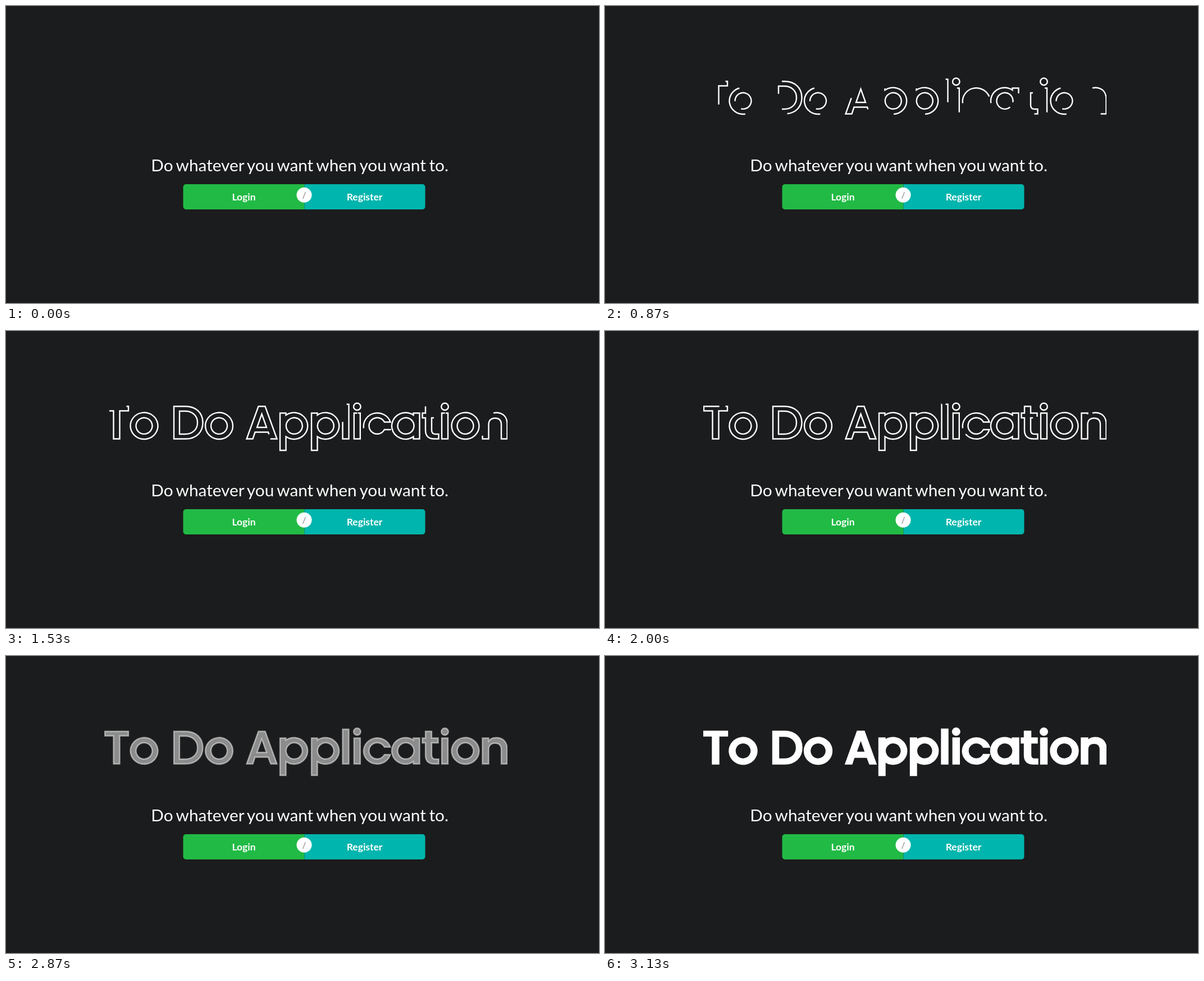
An HTML page that plays this animation: 1056x530 px, repeating every 8000 ms.

```html
<!DOCTYPE html>
<html lang="en">
<head>
<meta charset="utf-8">
<title>To Do Application</title>
<style>
  html, body { margin: 0; width: 100%; height: 100%; overflow: hidden; background: #1b1c1d; }
  svg { display: block; width: 1056px; height: 530px; }
  text { font-family: Lato, sans-serif; fill: #fff; }
  .lead { font-size: 29.75px; word-spacing: -2px; }
  .button { font-size: 17.5px; font-weight: 700; text-anchor: middle; }
  .or { font-size: 15px; font-weight: 700; text-anchor: middle; fill: rgba(0, 0, 0, .4); }
  #title path { fill: #fff; stroke: #fff; stroke-width: 2.4; fill-rule: evenodd; }
</style>
</head>
<body>
<svg viewBox="0 0 1056 530">
  <clipPath id="crop"><rect x="175" y="120" width="718" height="100"/></clipPath>
  <g id="title" clip-path="url(#crop)"></g>
  <text class="lead" x="258.300" y="295">Do whatever you want when you want to.</text>
  <path fill="#21ba45" d="M531.500 318H320.500a5 5 0 0 0 -5 5V358a5 5 0 0 0 5 5H531.500Z"/>
  <path fill="#00b5ad" d="M531.500 318H741.500a5 5 0 0 1 5 5V358a5 5 0 0 1 -5 5H531.500Z"/>
  <text class="button" x="423.500" y="347">Login</text>
  <text class="button" x="638.500" y="347">Register</text>
  <circle cx="531" cy="337.300" r="13.500" fill="#fff"/>
  <text class="or" x="531" y="342.500">/</text>
</svg>
<script>
const LOOP = 8000;
const DRAW = { from: -70, span: 2560, show: 65, hide: 2720 };
const FILL = { from: 2755, span: 400 };
const LEAD = 4; // each contour starts this far ahead of its corner
const MID = 169.3;

// Closed ellipse starting at an angle in degrees, dir 1 = clockwise
function ring(cx, cy, rx, ry, deg, dir) {
  const a = deg * Math.PI / 180;
  const dx = rx * Math.cos(a), dy = ry * Math.sin(a);
  const arc = s => `A${rx} ${ry} 0 0 ${dir > 0 ? 1 : 0} ${cx + s * dx} ${cy + s * dy}`;
  return `M${cx + dx} ${cy + dy}${arc(-1)}${arc(1)}Z`;
}

const bowl = (cx, deg) => ring(cx, MID, 14.5, 14.5, deg, -1);
const o = cx => ring(cx, MID, 24.5, 23.7, 81, 1) + bowl(cx, 105);
const p = x => `M${x + 10.5} 147V150A24.5 23.7 0 1 1 ${x + 10.5} 188.6V213H${x}V146.5H${x + 10.5}Z` +
  bowl(x + 25.3, 10);
const i = cx => `M${cx + 1.5} 146.5H${cx + 5.5}V192.5H${cx - 5.5}V146.5Z` +
  ring(cx, 135, 6.3, 6.3, 90, 1);

const T = "M214.5 134.5H218V142.5H202.5V192.5H191.5V142.5H176V134.5Z";
const D = "M315 134.5H320C338 134.5 350.5 146 350.5 163.5S338 192.5 320 192.5H299V134.5Z" +
  "M315 184H319C332 184 341 176 341 163.5S332 143 319 143H309V184Z";
const A = "M468.3 184.3L467 180.5H443.5L439.5 192.5H428.5L449.5 134.5H461.5L482.5 192.5H471.5Z" +
  "M460 172H464L455.5 148L447 172Z";
const l = "M606.5 130.7H610.5V192.5H599.5V130.7Z";
const c = "M637 173.3A24.5 23.7 0 0 1 684.5 162.5H673.8A14.5 14.5 0 1 0 673.8 176H684.5" +
  "A24.5 23.7 0 0 1 637 173.3Z";
const a = "M687.3 173.3A24.5 23.7 0 0 1 725.5 150V146.5H736.5V192.5H725.5V188.6" +
  "A24.5 23.7 0 0 1 687.3 173.3Z" + bowl(712, 10);
const t = "M762 155H758V177Q758 184 765 184H770.5V192.5H763Q747 192.5 747 177V155H741.5V146.5" +
  "H747V134.5H758V146.5H769.5V155Z";
const n = "M868 146.2Q870.5 145.7 873 145.7C885 145.7 892.5 153 892.5 166V192.5H882V167" +
  "C882 159 877.5 155.5 871 155.5S859.5 159 859.5 167V192.5H848.5V146.5H859.5V152" +
  "Q863.5 147 868 146.2Z";

const title = document.getElementById("title");
const letters = [T, o(246), D, o(379.5), A, p(488), p(544), l, i(625.3), c, a, t, i(781.5), o(818), n]
  .map(d => {
    const el = document.createElementNS("http://www.w3.org/2000/svg", "path");
    el.setAttribute("d", d);
    title.append(el);
    return { el, length: el.getTotalLength() };
  });

function bezier(x1, y1, x2, y2) {
  const at = (u, p1, p2) => 3 * (1 - u) * (1 - u) * u * p1 + 3 * (1 - u) * u * u * p2 + u * u * u;
  return x => {
    if (x <= 0) return 0;
    if (x >= 1) return 1;
    let lo = 0, hi = 1;
    for (let k = 0; k < 24; k++) {
      const m = (lo + hi) / 2;
      if (at(m, x1, x2) < x) lo = m; else hi = m;
    }
    return at(lo, y1, y2);
  };
}
const ease = bezier(.25, .1, .25, 1);
const easeInOut = bezier(.42, 0, .58, 1);

function render(ms) {
  const drawing = ms >= DRAW.show && ms < DRAW.hide;
  const drawn = easeInOut((ms - DRAW.from) / DRAW.span);
  const alpha = ease((ms - FILL.from) / FILL.span);
  title.style.fillOpacity = alpha;
  title.style.strokeOpacity = drawing ? 1 : alpha;
  for (const { el, length } of letters) {
    el.style.strokeDasharray = drawing ? `${drawn * length + LEAD} 2000` : "none";
  }
}

const start = performance.now();
function tick() {
  render((performance.now() - start) % LOOP);
  requestAnimationFrame(tick);
}
tick();
</script>
</body>
</html>
```
